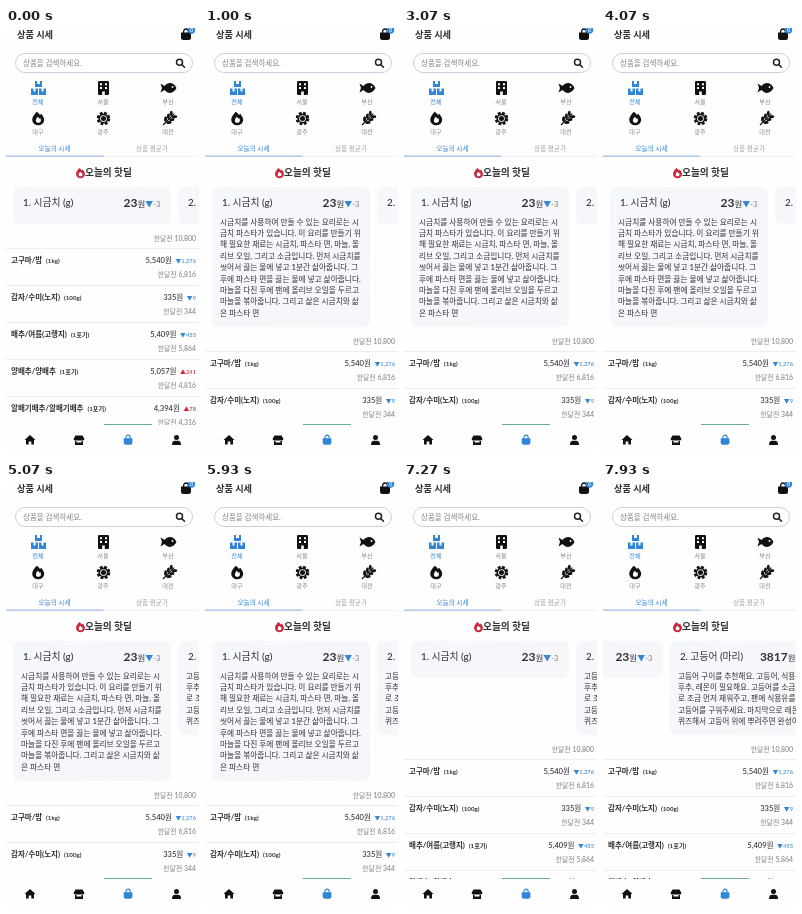
An HTML page for the animation above (8 s loop, 193x426 px).

```html
<!DOCTYPE html>
<html lang="ko">
<head>
<meta charset="utf-8">
<title>상품 시세</title>
<style>
  html, body { margin: 0; width: 100%; height: 100%; overflow: hidden; background: #fefefe; }
  svg { display: block; width: 100vw; height: 100vh; }
  text { font-family: Lato, "Noto Sans CJK KR", "Noto Sans CJK", sans-serif; font-weight: 500; fill: #303036; white-space: pre; }
  .bold { font-weight: 700; }
  .mid { text-anchor: middle; }
  .end { text-anchor: end; }
  .grey { fill: #85858c; }
  .pale { fill: #a3a3ac; }
  .blue { fill: #2f86d6; }
  .red { fill: #c92a3e; }
  .down { fill: #3586d4; }
  .icon { fill: #111; }
  .card { fill: url(#tint); }
  .body { font-size: 7.7px; }

  .list, .track, .card, .body { animation: 8s infinite step-end; }
  .list { animation-name: push; }
  .first .card { animation-name: grow1; }
  .second .card { animation-name: grow2; }
  .first .body { animation-name: show1; }
  .second .body { animation-name: show2; }
  .track { animation-name: swipe; animation-timing-function: linear; }

  @keyframes push {
    0% { transform: translateY(0); }
    6% { transform: translateY(103px); }
    83%, 100% { transform: translateY(57px); }
  }
  @keyframes grow1 { 0% { height: 37px; } 6% { height: 140px; } 83%, 100% { height: 37px; } }
  @keyframes grow2 { 0% { height: 37px; } 62%, 100% { height: 94px; } }
  @keyframes show1 { 0% { opacity: 0; } 6% { opacity: 1; } 83%, 100% { opacity: 0; } }
  @keyframes show2 { 0% { opacity: 0; } 62%, 100% { opacity: 1; } }
  @keyframes swipe {
    0%, 93.5% { transform: translateX(0); animation-timing-function: ease-in-out; }
    99.125% { transform: translateX(-105px); }
    100% { transform: translateX(-112px); }
  }
</style>
</head>
<body>
<svg viewBox="0 0 193 426" preserveAspectRatio="none">
  <defs>
    <linearGradient id="tint" x2="1" y2="1">
      <stop offset="0" stop-color="#f5f8fb"/><stop offset="1" stop-color="#f8f6fa"/>
    </linearGradient>
    <path id="flame" d="M4.500 0C6 1 7 2 7.800 3.200L9 2C10.500 3.800 12 6 12 8A6 5.500 0 0 1 0 8C0 5 2.500 2 4.500 0Z"/>
    <path id="drop" d="M5.500 5C6.200 5.700 6.800 6.400 7.200 7L8 6.200C9.600 9 8.500 11 6 11C3.500 11 2.600 8.500 5.500 5Z"/>
    <g id="bag">
      <path d="M0 4.500H10V9.500Q10 12 7.500 12H2.500Q0 12 0 9.500Z"/>
      <path d="M2.600 6V3.400A2.400 2.400 0 0 1 7.400 3.400V6" fill="none" stroke="currentColor" stroke-width="1.300"/>
    </g>
  </defs>

  <!-- header -->
  <text class="bold" x="11" y="9.500" font-size="9.200">상품 시세</text>
  <use href="#bag" class="icon" x="175" y="0" color="#111"/>
  <circle cx="185.500" cy="2" r="3.700" fill="#2f86d6"/>
  <text class="mid" x="185.500" y="4" font-size="5.500" style="fill:#fff">0</text>

  <rect x="9.500" y="25.500" width="177" height="19" rx="9.500" fill="#fff" stroke="#bcc4d8" stroke-width=".8"/>
  <text class="grey" x="17" y="37.800" font-size="7.500">상품을 검색하세요.</text>
  <g fill="none" stroke="#222" stroke-width="1.500" stroke-linecap="round">
    <circle cx="173.500" cy="34.300" r="3"/><path d="M175.800 36.600L178.500 39.300"/>
  </g>

  <!-- regions -->
  <path class="blue" d="M29 53H31V56H34V53H36V59H29ZM25 60.500H27.500V63.500H29.500V60.500H32V67H25ZM33 60.500H35.500V63.500H37.500V60.500H40V67H33Z"/>
  <g class="icon">
    <rect x="92" y="53" width="11" height="14" rx="1.200"/>
    <path fill="#fff" d="M94 55.200h2v2h-2zm5 0h2v2h-2zM94 59h2v2h-2zm5 0h2v2h-2zM96.200 63.500h2.600V67h-2.600z"/>
    <path d="M154.500 55.500L158.500 58C163 53 168 55 170.500 60C168 65 163 67 158.500 62L154.500 64.500L156 60Z"/>
    <circle cx="166.500" cy="59" r=".9" fill="#fff"/>
    <use href="#flame" x="26.200" y="83.800"/><use href="#drop" x="26.200" y="83.800" fill="#fff"/>
    <circle cx="97.500" cy="90.500" r="5.700" fill="none" stroke="#111" stroke-width="2.200" stroke-dasharray="2.800 1.677"/>
    <circle cx="97.500" cy="90.500" r="4.200" fill="#fff" stroke="#111" stroke-width="1.700"/>
    <circle cx="97.500" cy="90.500" r="2.500"/>
    <g id="wheat" transform="translate(157 97) rotate(45)">
      <rect x="-.6" y="-16" width="1.200" height="16"/>
    </g>
  </g>
  <g id="regions" font-size="6.200"></g>

  <!-- tabs -->
  <text class="mid blue" x="48.500" y="123.200" font-size="6.600">오늘의 시세</text>
  <text class="mid pale" x="146" y="123.200" font-size="6.600">상품 평균가</text>
  <rect y="128" width="193" height=".6" fill="#e8eaf1"/>
  <rect y="127.600" width="97.500" height="1" fill="#8fb0dc"/>

  <g transform="translate(70 140) scale(.75)">
    <use href="#flame" class="red"/><use href="#drop" fill="#fff"/>
  </g>
  <text class="bold" x="79" y="148.300" font-size="9.700">오늘의 핫딜</text>

  <!-- deals -->
  <g class="track" id="track"></g>

  <!-- prices -->
  <g class="list" id="list">
    <text class="end grey" x="190" y="212.500" font-size="6.900">한달전 10,800</text>
  </g>

  <!-- bottom bar -->
  <rect y="397" width="193" height="29" fill="#fefefe"/>
  <rect x="98" y="396" width="48" height="1" fill="#6ba99c"/>
  <g class="icon">
    <path d="M24 407L29.500 412H28V416.500H25.300V413.500H22.700V416.500H20V412H18.500Z"/>
    <path d="M69.500 407.500H76.500L78.500 411Q78 412.500 76.500 412.500H69.500Q68 412.500 67.500 411ZM69 413H70.500V414.500H75.500V413H77V417H69Z"/>
    <use href="#bag" class="blue" color="#2f86d6" transform="translate(117.700 406.300) scale(.87)"/>
    <circle cx="170.500" cy="409.500" r="2.500"/>
    <path d="M166 417Q166 412.800 169 412.800H172Q175 412.800 175 417Z"/>
  </g>
</svg>
<script>
  const byId = id => document.getElementById(id);
  const add = (id, markup) => byId(id).insertAdjacentHTML('beforeend', markup);

  ['전체', '서울', '부산', '대구', '광주', '대전'].forEach((name, i) => {
    const x = 32 + i % 3 * 65, y = i < 3 ? 76 : 106;
    add('regions', `<text class="mid ${i ? 'grey' : 'blue'}" x="${x}" y="${y}">${name}</text>`);
  });

  for (let i = 0; i < 3; i++) {
    const y = -6 - i * 4;
    for (const side of [-1, 1]) {
      add('wheat', `<ellipse cx="${side * 2.4}" cy="${y}" rx="1.5" ry="2.7" transform="rotate(${side * 40} ${side * 2.4} ${y})"/>`);
    }
  }

  const deals = [
    { kind: 'first', x: 7, title: '1. 시금치 (g)', price: 23, priceX: 117.5, diff: 3, lines: [
      '시금치를 사용하여 만들 수 있는 요리로는 시',
      '금치 파스타가 있습니다. 이 요리를 만들기 위',
      '해 필요한 재료는 시금치, 파스타 면, 마늘, 올',
      '리브 오일, 그리고 소금입니다. 먼저 시금치를',
      '씻어서 끓는 물에 넣고 1분간 삶아줍니다. 그',
      '후에 파스타 면을 끓는 물에 넣고 삶아줍니다.',
      '마늘을 다진 후에 팬에 올리브 오일을 두르고',
      '마늘을 볶아줍니다. 그리고 삶은 시금치와 삶',
      '은 파스타 면'] },
    { kind: 'second', x: 172, title: '2. 고등어 (마리)', price: 3817, priceX: 262, lines: [
      '고등어 구이를 추천해요. 고등어, 식용유,',
      '후추, 레몬이 필요해요. 고등어를 소금과 ',
      '로 조금 먼저 재워주고, 팬에 식용유를 두',
      '고등어를 구워주세요. 마지막으로 레몬을',
      '퀴즈해서 고등어 위에 뿌려주면 완성이'] }
  ];

  for (const { kind, x, title, price, priceX, diff, lines } of deals) {
    const body = lines.map((line, i) => `<text x="${x + 8}" y="${196.5 + i * 11.4}">${line}</text>`).join('');
    const change = diff ? `<tspan class="down" font-size="8">▼</tspan><tspan class="grey" font-size="7.5">-${diff}</tspan>` : '';
    add('track', `<g class="${kind}">
      <rect class="card" x="${x}" y="159" width="158" height="37" rx="6"/>
      <text x="${x + 10}" y="178" font-size="9.8">${title}</text>
      <text x="${priceX}" y="178.5"><tspan class="bold" font-size="12">${price}</tspan><tspan font-size="8.5">원</tspan>${change}</text>
      <g class="body">${body}</g></g>`);
  }

  const rows = [
    ['고구마/밤', '1kg', '5,540', '▼1,276', '6,816'],
    ['감자/수미(노지)', '100g', '335', '▼9', '344'],
    ['배추/여름(고랭지)', '1포기', '5,409', '▼455', '5,864'],
    ['양배추/양배추', '1포기', '5,057', '▲241', '4,816'],
    ['알배기배추/알배기배추', '1포기', '4,394', '▲78', '4,316']
  ];

  rows.forEach(([name, unit, price, diff, before], i) => {
    const y = 234.8 + i * 37;
    const tone = diff[0] === '▼' ? 'down' : 'red';
    add('list', `<rect y="${y - 14.8}" width="193" height=".7" fill="#e6e6ef"/>
      <text class="bold" x="5" y="${y}" font-size="7.5">${name}<tspan dx="4" font-size="6.2">(${unit})</tspan></text>
      <text class="end" x="190" y="${y}" font-size="7.6">${price}원<tspan class="${tone}" dx="3.5" font-size="5.8">${diff}</tspan></text>
      <text class="end grey" x="190" y="${y + 14.5}" font-size="6.9">한달전 ${before}</text>`);
  });
</script>
</body>
</html>
```
